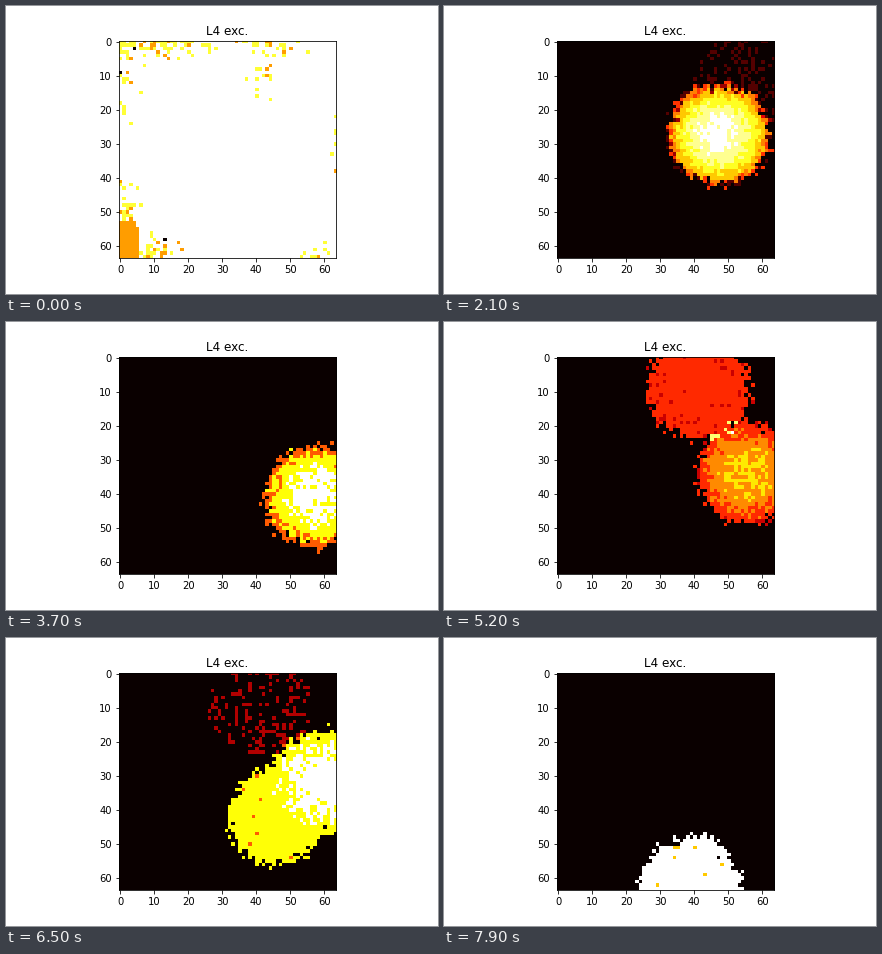
Write a matplotlib script that moves like this. It is 432 px wide and 288 px high and loops after 8000 ms.

```python
import numpy as np
import matplotlib.pyplot as plt
from matplotlib.animation import FuncAnimation

N = 64
FRAMES = 80
RISE, FALL = 4, 6.4        # steps a volley needs to build up and to fade
STRAGGLERS = (46, 47, 69)  # steps at which single late spikes reshuffle

rng = np.random.default_rng(4)
Y, X = np.mgrid[0:N, 0:N]


def bump(cx, cy, sx, sy):
    return np.exp(-((X - cx) / sx) ** 2 - ((Y - cy) / sy) ** 2)


def ramp(step, start, length):
    return np.clip((step - start) / length, 0, 1)


class Patch:
    """Round patch of firing cells with spike counts from edge to core."""

    def __init__(self, cx, cy, r, edge, core, on, off):
        dist = np.hypot(X - cx, Y - cy)
        inside = dist < r + rng.normal(0, 1, (N, N))
        profile = np.clip(1 - (dist / r) ** 2, 0, 1)
        self.level = inside * (edge + (core - edge) * profile)
        self.noise = rng.uniform(-0.5, 0.5, (N, N))
        self.on, self.off = on, off

    def counts(self, step):
        gain = ramp(step, self.on, RISE) - ramp(step, self.off, FALL)
        shift = sum(step >= s for s in STRAGGLERS)
        noise = np.roll(self.noise, shift) * (self.level > 0)
        return np.round(np.maximum(self.level * gain + noise, 0))


patches = [
    Patch(55, 11, 15.2, 4, 5.8, on=5, off=14.9),
    Patch(47, 27.3, 14.5, 4, 4, on=5, off=24),
    Patch(47, 27.3, 14.5, 1, 5, on=14, off=24),
    Patch(57, 40.7, 14.6, 3.8, 7.5, on=24, off=34),
    Patch(55.5, 34, 14.8, 5.2, 8.8, on=37, off=49),
    Patch(41, 9, 15, 3.8, 4, on=49, off=59),
    Patch(45.5, 42, 13.8, 2.95, 3, on=59, off=71),
    Patch(58.5, 32, 14.8, 2.9, 4, on=59, off=71),
    Patch(38.5, 62.3, 14.5, 2.95, 3, on=71, off=FRAMES),
]
onsets = sorted({p.on for p in patches})

# Opening activity: nearly saturated, with gaps along the borders.
gap = (0.9 * bump(11, 0, 14, 2.8) + 0.6 * bump(42, 0, 7, 3)
       + 0.25 * bump(0, 10, 4, 12) + 0.12 * bump(41, 8, 4, 10)
       + 0.35 * bump(64, 30, 2, 8) + 0.6 * bump(2, 50, 3, 5)
       + 0.6 * bump(8, 62, 6, 4) + 0.4 * bump(58, 62, 3, 2))
gap_noise = rng.random((N, N))
corner = (Y >= 53) & (X <= 4 + (Y >= 55))

# What is left of it while it fades away.
rest = (1 + bump(4, 34, 10, 8) + bump(20, 48, 9, 15)
        + 2 * bump(43, 52, 12, 14) + 0.6 * bump(62, 56, 6, 9)
        - 1.3 * bump(0, 62, 7, 12) - 1.1 * bump(5, 0, 14, 3))
rest += rng.normal(0, 0.25, (N, N))


def opening(step):
    p = gap * (1 + 0.2 * min(step, 2))
    field = 5.0 - (gap_noise < p) - (gap_noise < 0.25 * p)
    field[corner] = 3
    field[gap_noise < 0.04 * p] = 0
    w_full = 1 - ramp(step, 5, 4)
    w_rest = ramp(step, 5, 4) - ramp(step, 9, 4)
    return np.round(field * w_full + rest.clip(0) * w_rest)


def activity(step):
    """Patches of one volley merge, successive volleys add up."""
    total = sum(np.maximum.reduce([p.counts(step) for p in patches if p.on == on])
                for on in onsets if step > on)
    return np.maximum(opening(step), total)


fig, ax = plt.subplots(figsize=(6, 4), dpi=72)
fig.subplots_adjust(left=0.125, right=0.9, bottom=0.125, top=0.88)
image = ax.imshow(activity(0), cmap="hot", interpolation="nearest")
ax.set_title("L4 exc.")


def update(step):
    counts = activity(step)
    image.set_data(counts)
    image.set_clim(0, max(counts.max(), 1))
    return [image]


anim = FuncAnimation(fig, update, frames=FRAMES, interval=100,
                     repeat=True, repeat_delay=0)
plt.show()
```
